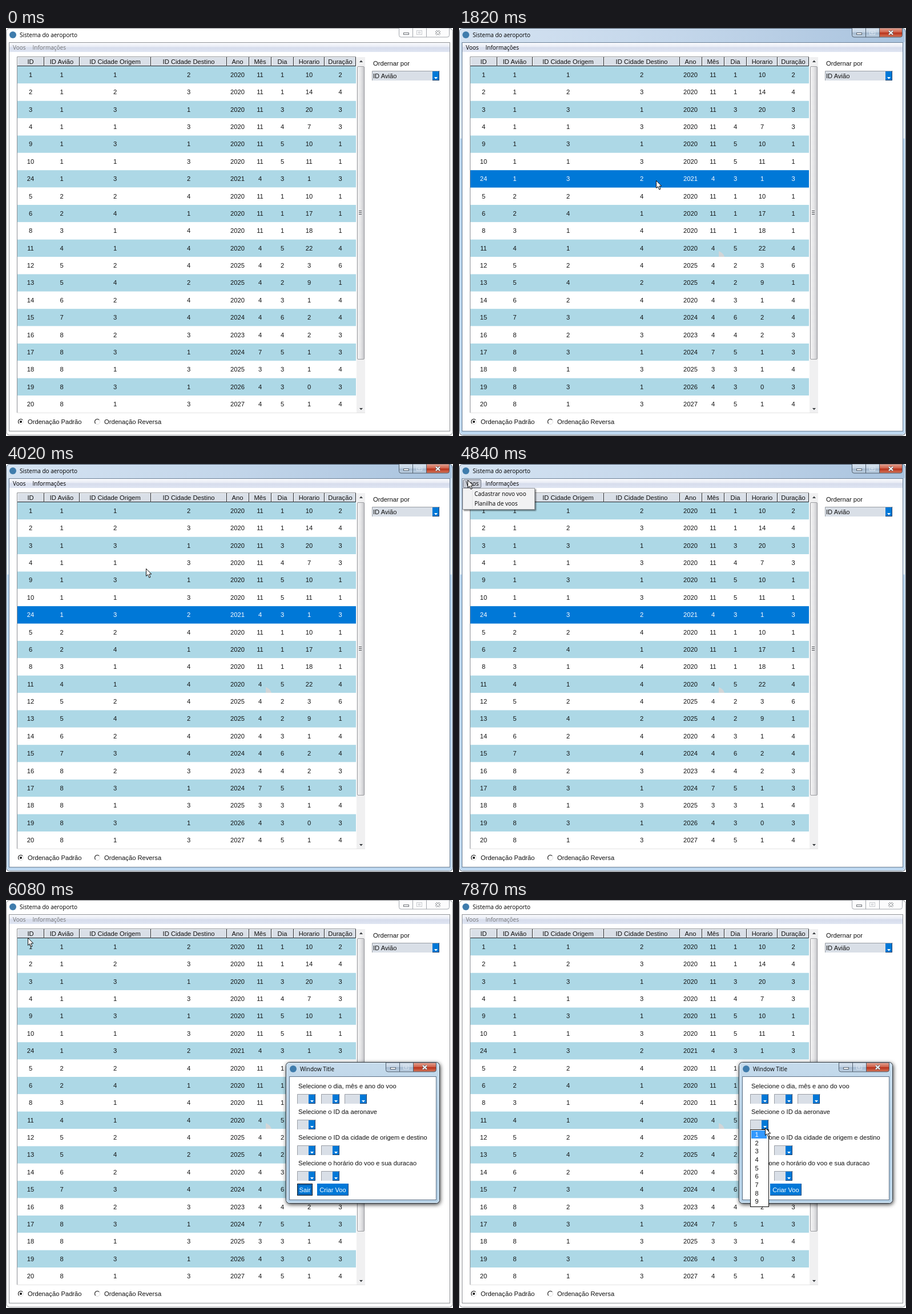
Write an HTML page that moves like this. It is 783x715 px and loops after 8000 ms.

```html
<!DOCTYPE html>
<html lang="pt">
<head>
<meta charset="utf-8">
<title>Sistema do aeroporto</title>
<style>
html, body { margin: 0; width: 100%; height: 100%; overflow: hidden; background: #fff; }
svg { display: block; width: 783px; height: 715px; }
text { font: 11.2px "Liberation Sans", Arial, sans-serif; fill: #111; white-space: pre; }
text.ui { font: 10px "Open Sans", "Noto Sans", sans-serif; fill: #000; }
.mid { text-anchor: middle; }
.inv, text.inv { fill: #fff; }
</style>
</head>
<body>
<svg id="stage" viewBox="0 0 783 715" xmlns="http://www.w3.org/2000/svg">
<defs>
  <linearGradient id="glassTitle"><stop offset="0" stop-color="#d5e3f2"/><stop offset=".5" stop-color="#c3d6ea"/><stop offset="1" stop-color="#a9c3de"/></linearGradient>
  <linearGradient id="glassSide" x2="0" y2="1"><stop offset="0" stop-color="#c5d8ec"/><stop offset=".27" stop-color="#e4eef8"/><stop offset=".272" stop-color="#b5d3ee"/><stop offset="1" stop-color="#bcd6ee"/></linearGradient>
  <linearGradient id="glassDialog" x2="0" y2="1"><stop offset="0" stop-color="#c6dbec"/><stop offset=".5" stop-color="#aecbe2"/><stop offset="1" stop-color="#b8d3e8"/></linearGradient>
  <linearGradient id="menuBar" x2="0" y2="1"><stop offset="0" stop-color="#fbfcfe"/><stop offset=".45" stop-color="#e6eaf4"/><stop offset=".5" stop-color="#d6dcec"/><stop offset="1" stop-color="#dfe5f2"/></linearGradient>
  <linearGradient id="thumb"><stop offset="0" stop-color="#f5f5f5"/><stop offset=".5" stop-color="#e6e6e8"/><stop offset="1" stop-color="#c4c5c9"/></linearGradient>
  <linearGradient id="redBtn" x2="0" y2="1"><stop offset="0" stop-color="#e5a594"/><stop offset=".48" stop-color="#cf5f48"/><stop offset=".52" stop-color="#b8301a"/><stop offset="1" stop-color="#d4775a"/></linearGradient>
  <linearGradient id="blueBtn" x2="0" y2="1"><stop offset="0" stop-color="#dbe6f1"/><stop offset=".48" stop-color="#c2d2e3"/><stop offset=".52" stop-color="#a5bad0"/><stop offset="1" stop-color="#bfd2e4"/></linearGradient>
  <filter id="shadow" x="-10%" y="-10%" width="120%" height="120%"><feDropShadow dx="1" dy="2" stdDeviation="3.5" flood-opacity=".75"/></filter>
  <filter id="softShadow" x="-10%" y="-20%" width="120%" height="150%"><feDropShadow dx="2" dy="2" stdDeviation="1" flood-opacity=".5"/></filter>
</defs>
</svg>
<script>
const LOOP = 8000;
const ROWS = 20, ROW_H = 30.37, ROW_TOP = 67, PICKED = 6;
const BLUE = '#0078d7', FIELD = '#d9dfe7', HILITE = '#3399ff';

// Table columns: heading, right edge, text centre, cell value by row.
const early = [1, 2, 3, 4, 9, 10, 24, 5, 6, 8];
const hours = [10, 14, 20, 7, 10, 11, 1, 10, 17, 18, 22];
const columns = [
  ['ID', 67, 43, i => early[i] ?? i + 1],
  ['ID Avião', 129, 97.5, i => '11111112234556788888'[i]],
  ['ID Cidade Origem', 254, 191, i => '12313132411242323131'[i]],
  ['ID Cidade Destino', 387, 320, i => '23131324144424431313'[i]],
  ['Ano', 426, 405.5, i => '202' + '00000010000550434567'[i]],
  ['Mês', 465, 445, i => i < 10 && i !== PICKED ? 11 : i === 16 ? 7 : i === 17 ? 3 : 4],
  ['Dia', 504, 484, i => '11345531115223645335'[i]],
  ['Horario', 558, 531, i => hours[i] ?? '391221101'[i - 11]],
  ['Duração', 613, 585.5, i => '24331131114614433434'[i]]
];

// Pointer legs: first time, last time, steps, start, end, easing of the progress.
const easeOut = u => 1 - (1 - u) ** 1.4;
const easeIn = u => u ** 1.56;
const linear = u => u;
const legs = [
  [200, 1180, 5, [733, 703], [349, 274], easeOut],
  [1380, 1380, 0, [345, 267], [345, 267], linear],
  [2400, 3420, 5, [323, 266], [431, 268], u => [0, .42, 1, .87, .69, .52][Math.round(u * 5)]],
  [3620, 4640, 5, [330, 240], [15, 28], easeOut],
  [4840, 5440, 3, [15, 28], [20, 48], linear],
  [6060, 6860, 4, [38, 66], [489, 381], easeIn],
  [7090, 7270, 1, [524, 389], [535, 394], linear],
  [7870, 7870, 0, [536, 399], [536, 399], linear]
];

function pointerAt(t) {
  const leg = legs.filter(l => l[0] <= t).pop();
  if (!leg) return null;
  const [from, to, steps, a, b, ease] = leg;
  const u = steps ? Math.min(steps, Math.floor((t - from) / (to - from) * steps + .001)) / steps : 0;
  return a.map((v, k) => Math.round(v + (b[k] - v) * ease(u)));
}

const rect = (x, y, w, h, fill, more = '') => `<rect x="${x}" y="${y}" width="${w}" height="${h}" fill="${fill}" ${more}/>`;
const path = (d, fill, more = '') => `<path d="${d}" fill="${fill}" ${more}/>`;
const line = (d, color, width = 1) => path(d, 'none', `stroke="${color}" stroke-width="${width}"`);
const text = (x, y, s, cls = '', more = '') => `<text x="${x}" y="${y}" class="${cls}" ${more}>${s}</text>`;
const group = (id, body) => `<g id="${id}">${body}</g>`;
const icon = (x, y) => `<circle cx="${x}" cy="${y}" r="6" fill="#3f7cac"/>`;

function windowButtons(x, y, active) {
  const edge = active ? '#4e5d6c' : '#a3a7ad';
  const glyph = active ? '#fff' : '#fdfdfd';
  const rim = active ? '#56616d' : '#6f7378';
  const body = active ? 'url(#blueBtn)' : '#fcfcfd';
  const dim = active ? '#dce6f0' : '#c9ccd0';
  const shape = `M${x + .5} ${y} v12.5 q0 3.5 3.5 3.5 h81 q3.5 0 3.5 -3.5 v-12.5 z`;
  const red = `M${x + 48.5} ${y} v16 h36.5 q3.5 0 3.5 -3.5 v-12.5 z`;
  const cross = `M${x + 65} ${y + 5} l7 6.5 m0 -6.5 l-7 6.5`;
  return path(shape, body) + (active ? path(red, 'url(#redBtn)') : '') +
    line(shape + `M${x + 24.5} ${y} v16 M${x + 48.5} ${y} v16`, edge) +
    rect(x + 8.5, y + 8.5, 9, 3, glyph, `stroke="${rim}"`) +
    rect(x + 31.5, y + 4.5, 9, 7, 'none', `stroke="${dim}"`) + rect(x + 34.5, y + 7, 3, 2, 'none', `stroke="${dim}"`) +
    line(cross, rim, 3.6) + line(cross, glyph, 1.8);
}

function combo(x, y, w, value = '') {
  const b = x + w - 12;
  return rect(x, y, w, 17, FIELD) + line(`M${x + .5} ${y + 17} v-16.5 h${w}`, '#9a9ea5') +
    rect(b, y + 1, 12, 16, BLUE) + line(`M${b} ${y + 16.5} h11.5 v-16`, '#1d3f66') +
    path(`M${b + 3} ${y + 11} h6 l-3 3.5 z`, '#fff') + text(x + 2, y + 13, value);
}

function mainFrame(active) {
  const fill = active ? 'url(#glassSide)' : '#fff';
  const rim = active ? '#3f4a57' : '#85888c';
  return rect(.5, .5, 782, 713, fill, `rx="6" stroke="${rim}"`) +
    (active ? rect(1, 1, 781, 25, 'url(#glassTitle)', 'rx="5"') +
      line('M1.5 7 V707 q0 5.5 5.5 5.5 H776 q5.5 0 5.5 -5.5 V7', '#eef6fd') : '') +
    rect(5.5, 25.5, 772, 681, '#fff', `stroke="${active ? '#6d8197' : '#8f9296'}"`) +
    rect(6, 26, 771, 16, 'url(#menuBar)') +
    windowButtons(688, 0, active);
}

function row(i, fill, cls) {
  const y = ROW_TOP + i * ROW_H;
  return rect(20, y.toFixed(2), 593, ROW_H, fill) +
    columns.map(([, , mid, value]) => text(mid, Math.round(y + 19), value(i), cls)).join('');
}

function table() {
  let x = 20, head = '', rows = '';
  for (const [name, right, mid] of columns) {
    head += rect(x, 51, right - x, 16, FIELD) + line(`M${x + .5} 66 V51.5 H${right - 1}`, '#fafbfc') +
      line(`M${x} 66.5 H${right - .5} V51`, '#25282c') + text(mid, 63, name, 'mid');
    x = right;
  }
  for (let i = 0; i < ROWS; i++) rows += row(i, i % 2 ? '#fff' : '#add8e6', 'mid');
  return rows + head + line('M19.5 674.5 V50.5 H613', '#8b8f94') + line('M19 674.5 H629', '#e3e3e3');
}

const scrollbar = rect(614, 51, 15, 623, '#f0f0f1') +
  path('M619 60 h6 l-3 -3.5 z M619 666 h6 l-3 3.5 z', '#3c3f43') +
  rect(615.5, 67.5, 12, 513, 'url(#thumb)', 'rx="1.5" stroke="#9b9ca0"') +
  line('M618 320.5 h5 m-5 3 h5 m-5 3 h5', '#4c4f54');

function radio(x, label, on) {
  return `<circle cx="${x}" cy="690" r="4.2" fill="#fff"/>` +
    line(`M${x - 3.2} 693.2 A4.5 4.5 0 1 1 ${x + 3.2} 686.8`, '#333', 1.3) +
    line(`M${x - 3.2} 693.2 A4.5 4.5 0 0 0 ${x + 3.2} 686.8`, '#dedede') +
    (on ? `<circle cx="${x}" cy="690" r="1.9"/>` : '') + text(x + 12, 694, label);
}

function menu() {
  return rect(7.5, 27.5, 31, 14, '#c9cdd6', 'rx="1.5" stroke="#737a87"') + text(12, 38, 'Voos', 'ui') +
    rect(6.5, 42.5, 126, 37, '#f2f2f3', 'stroke="#97999d" filter="url(#softShadow)"') +
    line('M23.5 45 V78', '#e2e3e5') +
    text(27, 56, 'Cadastrar novo voo', 'ui') + text(27, 73, 'Planilha de voos', 'ui');
}

function pushButton(x, w, label, focused) {
  return rect(x, 497, w, 21, BLUE) + line(`M${x} 517.5 h${w - .5} v-20`, '#174a7c') +
    (focused ? rect(x + .5, 497.5, w - 1, 20, 'none', 'stroke="#111"') +
      rect(x + 2.5, 499.5, w - 5, 16, 'none', 'stroke="#0a2c50" stroke-dasharray="1 1"') : '') +
    text(x + w / 2, 512, label, 'mid inv');
}

function dialog() {
  const labels = ['Selecione o dia, mês e ano do voo', 'Selecione o ID da aeronave',
    'Selecione o ID da cidade de origem e destino', 'Selecione o horário do voo e sua duracao'];
  return rect(490.5, 284.5, 269, 247, 'url(#glassDialog)', 'rx="6" stroke="#26323d" filter="url(#shadow)"') +
    rect(491.5, 285.5, 267, 245, 'none', 'rx="5" stroke="#e6f2fb"') +
    rect(496.5, 309.5, 257, 216, '#fff', 'stroke="#5d7186"') +
    icon(503, 296) + text(515, 300, 'Window Title', 'ui') + windowButtons(665, 285, true) +
    labels.map((s, i) => text(512, 330 + 45 * i, s) + combo(510, 340 + 45 * i, 32)).join('') +
    [340, 430, 475].map(y => combo(552, y, 32)).join('') + combo(593, 340, 39) +
    pushButton(510, 27, 'Sair', true) + pushButton(545, 55, 'Criar Voo', false);
}

function list() {
  let items = '';
  for (let i = 0; i < 9; i++) items += text(521.5, Math.round(415 + 14.65 * i), i + 1, 'mid');
  return rect(510.5, 402.5, 32, 135, '#fff', 'stroke="#111"') + items;
}

const stage = document.getElementById('stage');
stage.insertAdjacentHTML('beforeend',
  group('idle', mainFrame(false)) + group('active', mainFrame(true)) +
  icon(12, 12) + text(24, 16, 'Sistema do aeroporto', 'ui') +
  group('bar', text(12, 38, 'Voos', 'ui', 'style="fill:inherit"') + text(46.5, 38, 'Informações', 'ui', 'style="fill:inherit"')) +
  table() + scrollbar +
  group('picked', row(PICKED, BLUE, 'mid inv')) +
  group('smudge', path('M455 401 V391 q8 3 10 10 z', '#d3d5d7')) +
  text(643, 66, 'Ordernar por') + combo(641, 75, 118, 'ID Avião') +
  radio(26, 'Ordenação Padrão', true) + radio(160, 'Ordenação Reversa', false) +
  group('hover', rect(7.5, 27.5, 31, 14, '#dde2ec', 'rx="1.5" stroke="#a4acba"') + text(12, 38, 'Voos', 'ui')) +
  group('menu', menu()) +
  group('item', rect(9, 45, 122, 16, HILITE) + text(27, 56, 'Cadastrar novo voo', 'ui inv')) +
  group('dialog', dialog()) + group('list', list()) +
  group('choice', rect(512, 404, 27, 14, HILITE) + text(521.5, 415, '1', 'mid inv')) +
  group('pointer', path('M.5 .5 V13.5 L3.5 10.7 L5.8 16.2 L8 15.2 L5.8 10 H9.8 Z', '#fff', 'stroke="#111"')));

const el = id => document.getElementById(id);
const show = (id, on) => el(id).setAttribute('visibility', on ? 'visible' : 'hidden');

function draw(t) {
  const within = (from, to = LOOP) => t >= from && t < to;
  const active = within(1600, 6060);
  show('idle', !active);
  show('active', active);
  el('bar').setAttribute('fill', active ? '#000' : '#777');
  show('picked', within(1600, 5860));
  show('smudge', within(1000));
  show('hover', within(4640, 4840));
  show('menu', within(4840, 5860));
  show('item', within(5440, 6060));
  el('item').setAttribute('opacity', t < 5860 ? 1 : .83);
  show('dialog', within(6060));
  show('list', within(7670));
  show('choice', within(7870));

  const spot = pointerAt(t);
  show('pointer', !!spot);
  if (spot) el('pointer').setAttribute('transform', `translate(${spot})`);
}

const start = performance.now();
function tick() {
  draw((performance.now() - start) % LOOP);
  requestAnimationFrame(tick);
}
tick();
</script>
</body>
</html>
```
